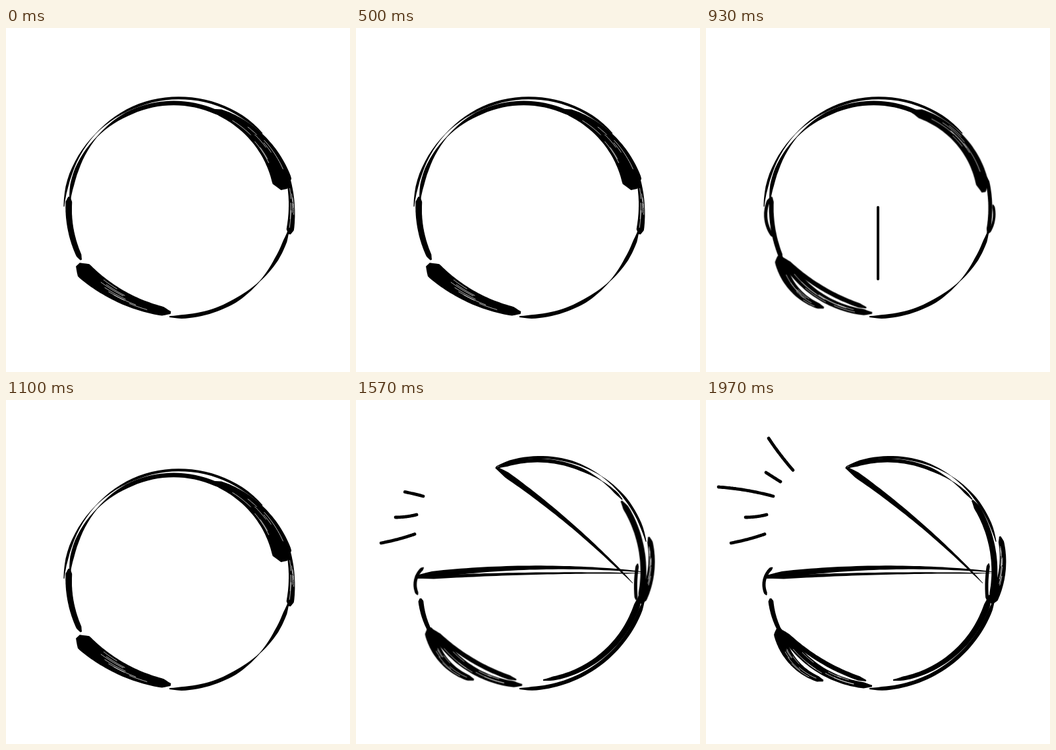
An HTML page for the animation above (2 s loop, 522 by 522 pixels).

```html
<!DOCTYPE html>
<html lang="en">
<head>
<meta charset="utf-8">
<title>Shouting circle</title>
<style>
@property --pen { syntax: "<number>"; inherits: true; initial-value: -99; }
html, body { margin: 0; width: 100%; height: 100%; overflow: hidden; background: #fff; }
svg { display: block; width: 100vw; height: 100vh; animation: pen 2s infinite; }
.dry { fill: none; stroke: #fff; stroke-width: .9; opacity: .8; }
.shut { animation: shut 2s step-end infinite; }
.open { animation: open 2s step-end infinite; --start: -300ms; }

/* three poses, a third of the cycle each */
.tight, .loose, .mid { animation: pose .5s step-end infinite calc(var(--start, 0ms) - 4ms - var(--phase)); }
.tight { --phase: 0ms; }
.loose { --phase: 333.3ms; }
.mid { --phase: 166.7ms; }
.mid use { transform-origin: 262px 272px; transform: scale(.99); }

.hand { transform-origin: 261px 271px; stroke: #000; stroke-width: 3.8; stroke-linecap: round;
  animation: spin 2s infinite, show 2s step-end infinite; }
.rays path { fill: none; stroke: #000; stroke-width: 4.8; stroke-linecap: round;
  stroke-dasharray: calc(1px * clamp(0, var(--pen) - var(--from), var(--len))) 999px;
  opacity: calc((var(--pen) - var(--from)) * 99 + 1); }

@keyframes shut { 0% { opacity: 1 } 60%, 100% { opacity: 0 } }
@keyframes open { 0% { opacity: 0 } 60%, 100% { opacity: 1 } }
@keyframes pose { 0% { opacity: 1 } 33.33%, 100% { opacity: 0 } }
@keyframes show { 0%, 55%, 100% { opacity: 0 } 33.5% { opacity: 1 } }
@keyframes spin {
  0%, 32.1% { transform: rotate(-90deg); animation-timing-function: steps(12) }
  57.1%, 100% { transform: rotate(270deg) }
}
@keyframes pen {
  0% { --pen: -99; animation-timing-function: step-end }
  63.5% { --pen: 8.4; animation-timing-function: steps(3) }
  68.5% { --pen: 43.5; animation-timing-function: steps(11) }
  86.5% { --pen: 172.2; animation-timing-function: steps(7) }
  98.5%, 100% { --pen: 264 }
}
</style>
</head>
<body>
<svg viewBox="0 0 522 522">
  <g class="shut">
    <g id="ring"></g>
    <g class="tight" id="ringTight"></g>
    <g class="loose"><g id="ringLoose"></g></g>
    <g class="mid"><use href="#ringLoose"/></g>
  </g>
  <g class="open">
    <g id="mouth"></g>
    <g class="tight" id="mouthTight"></g>
    <g class="loose"><g id="mouthLoose"></g></g>
    <g class="mid"><use href="#mouthLoose"/></g>
  </g>
  <path class="hand" d="M262 271H371"/>
  <g class="rays" id="rays"></g>
</svg>
<script>
const { min, max, abs, sin, cos, atan, hypot } = Math;
const mix = (a, b, t) => a + (b - a) * t;

let seed = 7;
const rand = () => (seed = seed * 16807 % 2147483647) / 2147483647;

// Circular arc between two points; bend is its height over the chord.
function arc(x0, y0, x1, y1, bend) {
  const len = hypot(x1 - x0, y1 - y0), ux = (x1 - x0) / len, uy = (y1 - y0) / len;
  const half = 2 * atan(2 * (bend || .01) / len), r = len / 2 / sin(half);
  return (t, off = 0) => {
    const a = mix(-half, half, t), q = abs(r) + off * (r < 0 ? -1 : 1);
    const along = len / 2 + Math.sign(r) * q * sin(a);
    const up = Math.sign(r) * (q * cos(a) - abs(r) * cos(half));
    return [x0 + ux * along + uy * up, y0 + uy * along - ux * up];
  };
}

const trace = (f, a = 0, b = 1, n = 40) =>
  Array.from({ length: n + 1 }, (_, i) => f(mix(a, b, i / n)).map(v => v.toFixed(1)).join(" "));

function add(layer, d, cls) {
  const path = document.createElementNS("http://www.w3.org/2000/svg", "path");
  path.setAttribute("d", "M" + d);
  if (cls) path.setAttribute("class", cls);
  document.getElementById(layer).append(path);
  return path;
}

// Ink along an arc: width runs from w0 to w1, fades at gap, wide strokes get dry scratches.
function brush(layer, ends, bend, w0, w1 = w0, gap = 9) {
  const at = arc(...ends, bend);
  const half = t => mix(w0, w1, t) / 2 * min(1, .3 + 9 * t, .3 + 9 * (1 - t), .12 + 5 * abs(t - gap));
  const outer = trace(t => at(t, half(t))), inner = trace(t => at(t, -half(t)));
  add(layer, outer.concat(inner.reverse()).join("L") + "Z");
  if (max(w0, w1) < 11) return;
  for (let i = 0; i < 7; i++) {
    const lane = mix(-.7, .7, rand()), from = mix(.1, .6, rand());
    add(layer, trace(t => at(t, lane * half(t)), from, from + mix(.1, .3, rand()), 12).join("L"), "dry");
  }
}

// Bottom swipes stay the same with the mouth shut or open.
for (const body of ["ring", "mouth"]) {
  brush(body + "Tight", [250, 432, 109, 359], 13, 13, 27);
  brush(body + "Loose", [243, 426, 116, 350], 9, 7);
  brush(body + "Loose", [252, 434, 118, 352], 20, 9, 13);
  brush(body + "Loose", [178, 426, 110, 346], 16, 8, 18);
}

brush("ring", [88, 271, 389, 160], 105, 4, 4, .3);
brush("ring", [97, 262, 340, 139], 78, 6, 7, .33);
brush("ring", [429, 306, 248, 438], 40, 6, 6, .38);

brush("ringTight", [313, 124, 422, 245], 22, 9, 32);
brush("ringTight", [427, 224, 430, 313], 5, 6, 12);
brush("ringTight", [114, 352, 96, 256], 7, 8, 10);

brush("ringLoose", [313, 125, 423, 249], 26, 14, 20);
brush("ringLoose", [427, 226, 429, 312], 5, 6);
brush("ringLoose", [437, 268, 430, 312], 5, 4);
brush("ringLoose", [114, 352, 98, 256], 6, 7);
brush("ringLoose", [101, 318, 95, 258], 9, 5);

brush("mouth", [213, 101, 440, 215], 60, 4, 4, .57);
brush("mouth", [214, 103, 404, 151], 31, 6, 5, .8);
brush("mouth", [212, 102, 420, 278], 7, 10, 2);
brush("mouth", [90, 268, 437, 261], 10, 10.5, 2);
brush("mouth", [92, 270, 437, 263], 3, 6, 1);
brush("mouth", [431, 296, 284, 425], 31, 10, 6);
brush("mouth", [438, 300, 248, 438], 41, 6);
brush("mouth", [114, 354, 98, 301], 3, 6, 8);

brush("mouthTight", [405, 152, 437, 308], 17, 13, 22);
brush("mouthTight", [97, 306, 99, 254], 3, 7);

brush("mouthLoose", [404, 152, 432, 306], 17, 9);
brush("mouthLoose", [446, 207, 433, 309], 10, 8, 13);
brush("mouthLoose", [429, 248, 427, 304], -2, 5);
brush("mouthLoose", [92, 296, 101, 254], 8, 5);

let drawn = 0;
function ray(ends, bend) {
  const path = add("rays", trace(arc(...ends, bend)).join("L")), len = path.getTotalLength();
  path.style.setProperty("--from", drawn);
  path.style.setProperty("--len", len);
  drawn += len;
}
ray([89, 203.5, 38, 217], 1);
ray([92, 174, 60, 178], 1);
ray([102, 146, 19, 132], -2);
ray([113, 124, 91, 110], 0);
ray([132, 106.5, 95, 58], 1);
</script>
</body>
</html>
```
